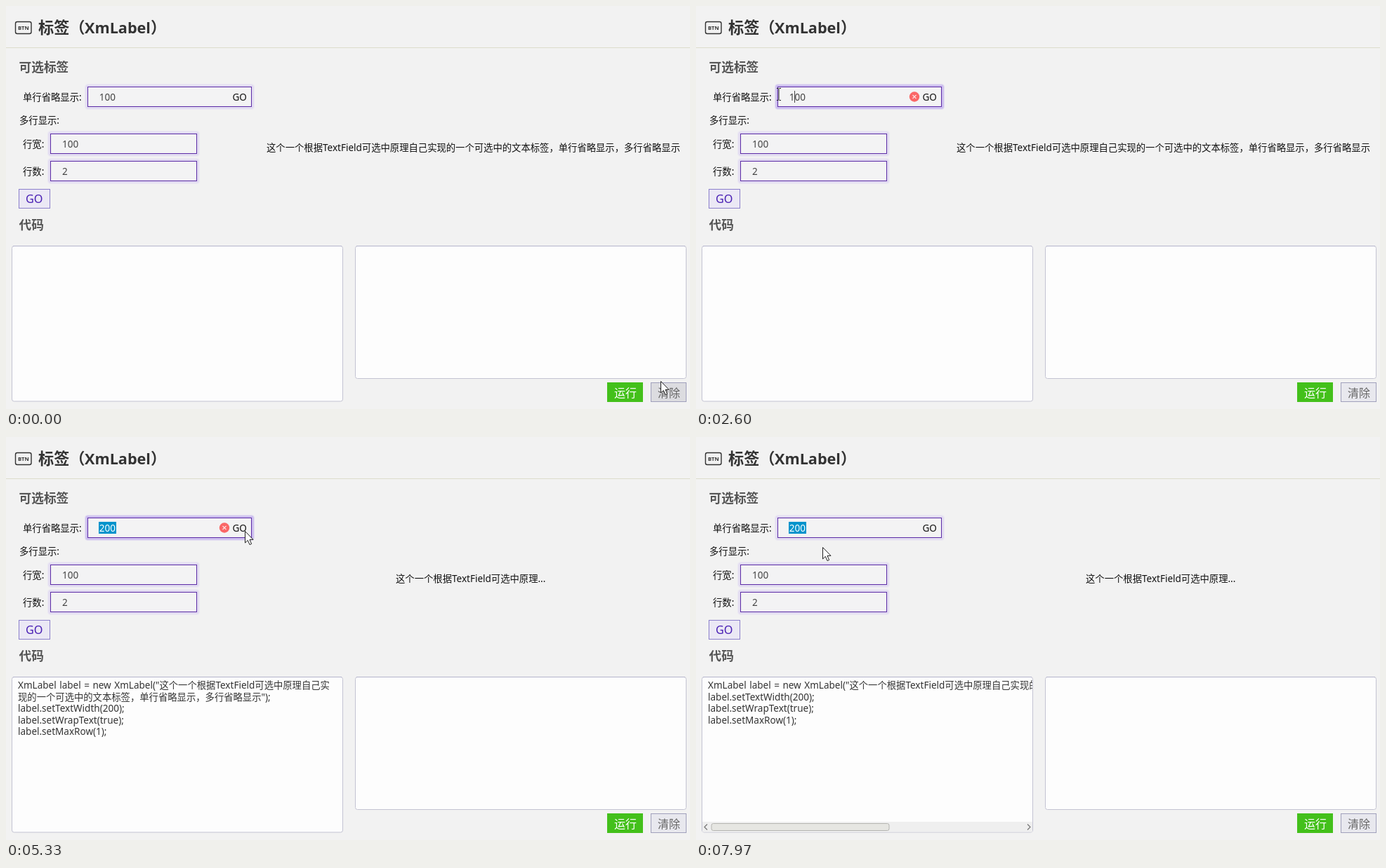
Write an HTML page that moves like this. It is 974 px wide and 575 px high and loops after 8 s.

```html
<!DOCTYPE html>
<html lang="zh-CN">
<head>
<meta charset="utf-8">
<style>
html, body { margin: 0; width: 100%; height: 100%; overflow: hidden; background: #f2f2f2; }
svg { display: block; }
text { font-family: "Noto Sans", "Noto Sans CJK SC", "Noto Sans CJK", sans-serif; white-space: pre; }
.code { word-spacing: 1px; }
</style>
</head>
<body>
<svg id="stage" width="974" height="575" viewBox="0 0 974 575"></svg>
<script>
const LOOP = 8000;
const INTRO = '这个一个根据TextField可选中原理';
const REST1 = '自己实', REST2 = '现的一个可选中的文本标签，单行省略显示，多行省略显示';
const FULL = INTRO + REST1 + REST2;

const esc = s => s.replace(/&/g, '&amp;').replace(/</g, '&lt;').replace(/>/g, '&gt;');
// Latin runs are set a touch larger than the Chinese ones
const runs = s => esc(s).replace(/[ -~]+/g, m => `<tspan font-size="1.015em">${m}</tspan>`);
const text = (x, y, s, fill = '#111', size = 13.33, extra = '') =>
  `<text x="${x}" y="${y}" fill="${fill}" font-size="${size}" ${extra}>${runs(s)}</text>`;
const box = (x, y, w, h, fill, stroke = 'none', extra = '') =>
  `<rect x="${x}" y="${y}" width="${w}" height="${h}" fill="${fill}" stroke="${stroke}" ${extra}/>`;
const group = (id, inner) => `<g id="${id}">${inner}</g>`;
const code = lines => lines.map((s, i) =>
  text(17, 359 + i * 16.6, s, '#333', 13.33, 'class="code"')).join('');

const fields = [
  { x: 116.5, y: 115.5, w: 233, icon: 311 },
  { x: 63.5, y: 182.5, w: 208, icon: 258 },
  { x: 63.5, y: 221.5, w: 208, icon: 258 }
];
const field = ({ x, y, w, icon }, i) => {
  const cy = y + 14;
  const ring = (width, opacity) => box(x, y, w, 28, 'none', '#8a62e6',
    `stroke-width="${width}" stroke-opacity="${opacity}" stroke-linejoin="round"`);
  return ring(9, .07) + ring(6, .1) + group('glow' + i, ring(8, .16) + ring(6, .1)) +
    box(x, y, w, 28, '#f3f3f4', '#5c2ca6') +
    group('icon' + i, `<circle cx="${icon}" cy="${cy}" r="7.2" fill="#fa6767"/>
      <path d="M${icon - 2.5} ${cy - 2.5}l5 5m0 -5l-5 5" stroke="#ffdede" stroke-width="1.2"/>`);
};

const stage = document.getElementById('stage');
stage.innerHTML =
  box(0, 0, 974, 575, '#f2f2f2') +
  box(13.5, 22.5, 22.5, 17, 'none', '#333', 'rx="2.5" stroke-width="1.4"') +
  text(24.8, 33.5, 'BTN', '#333', 7.5, 'text-anchor="middle" font-weight="600"') +
  text(46, 39, '标签（', '#333', 22.2, 'font-weight="700"') +
  text(112, 39, 'XmLabel', '#333', 21.3, 'font-weight="700"') +
  text(206, 39, '）', '#333', 22.2, 'font-weight="700"') +
  box(0, 59, 974, 1, '#dcdccb') +
  text(18.5, 93.5, '可选标签', '#555', 17.7, 'font-weight="700"') +
  text(18.5, 319, '代码', '#555', 17.7, 'font-weight="700"') +
  text(24, 134.5, '单行省略显示:') + text(19, 168, '多行显示:') +
  text(24, 202, '行宽:') + text(24, 241, '行数:') +
  fields.map(field).join('') +
  text(322.5, 134.5, 'GO') +
  box(132, 121, 25, 17, '#0093cc', 'none', 'id="pick"') +
  text(132.8, 134.5, '100', '#444', 13.33, 'id="value"') +
  box(140, 121, 1, 17, '#444', 'none', 'id="caret"') +
  text(80, 201.7, '100', '#444') + text(80, 240.7, '2', '#444') +
  box(18.5, 261.5, 44, 27, '#ebe8f5', '#8c80cc') + text(28, 281, 'GO', '#4a20b4', 16) +
  group('before', text(371, 207, FULL)) +
  group('after', text(555, 207, INTRO + '...')) +
  box(8.5, 342.5, 471, 221.5, '#fdfdfd', '#c3c3d2', 'rx="3"') +
  box(497.5, 342.5, 471, 189, '#fdfdfd', '#c3c3d2', 'rx="3"') +
  box(10, 342, 468, 1, '#b4b4cc') + box(499, 342, 468, 1, '#b4b4cc') +
  group('wrapped', code([`XmLabel label = new XmLabel("${INTRO}${REST1}`, `${REST2}");`,
    'label.setTextWidth(200);', 'label.setWrapText(true);', 'label.setMaxRow(1);'])) +
  group('unwrapped', `<svg width="479" height="575">` +
    code([`XmLabel label = new XmLabel("${FULL}");`,
      'label.setTextWidth(200);', 'label.setWrapText(true);', 'label.setMaxRow(1);']) + `</svg>` +
    box(9, 549, 470, 14.5, '#efefef') +
    box(22, 551.5, 253, 10, '#e6e6e2', '#b4b4b0', 'rx="2.5"') +
    `<path d="M16 552.5l-4 4 4 4M472 552.5l4 4-4 4" fill="none" stroke="#777" stroke-width="1.2"/>`) +
  box(856, 537, 51, 28, '#43c01b') + text(866, 558, '运行', '#fff', 16) +
  box(918.5, 537.5, 50, 27, '#e8e8ee', '#a0a0bc', 'id="clear"') + text(928, 558, '清除', '#666', 16) +
  group('arrow', `<path d="M.5 .5V17L4.3 13.4 7 19.6 9.6 18.5 7 12.4H12Z" fill="#fff"
    stroke="#222" stroke-linejoin="round"/>`) +
  group('beam', `<path d="M-3 -8.5H-.5M.5 -8.5H3M0 -8V8M-3 8.5H-.5M.5 8.5H3" stroke="#222"/>`);

const el = {};
stage.querySelectorAll('[id]').forEach(e => el[e.id] = e);
const show = (id, on) => el[id].setAttribute('visibility', on ? 'visible' : 'hidden');

// pointer path: time, x, y
const path = [
  [30, 932, 535], [670, 300, 557], [830, 300, 557], [1030, 250, 360], [1330, 185, 82],
  [1530, 167, 115], [1630, 163, 126], [2300, 163, 126], [2450, 141, 128], [2520, 141, 128],
  [2670, 99, 125], [4300, 99, 125], [5100, 340, 134], [5400, 340, 134], [5500, 340, 136],
  [6030, 340, 136], [6300, 240, 180], [6630, 140, 243], [6800, 135, 243], [7070, 145, 216],
  [7430, 165, 204], [7670, 165, 204], [7970, 180, 157]
];
function pointer(t) {
  const i = path.findIndex(p => p[0] > t);
  if (i < 1) return (i ? path[path.length - 1] : path[0]).slice(1);
  const [a, b] = [path[i - 1], path[i]];
  const k = (t - a[0]) / (b[0] - a[0]);
  return [1, 2].map(j => Math.round(a[j] + (b[j] - a[j]) * k));
}

function draw(t) {
  const [x, y] = pointer(t);
  const within = (t0, t1) => t >= t0 && t < t1;

  let beam = false;
  fields.forEach((f, i) => {
    const near = x > f.x - 6 && x < f.x + f.w + 5 && y > f.y - 6 && y < f.y + 32;
    const hover = near && !(i === 1 && y >= 215);
    const on = i ? hover : hover || within(1480, 6150);
    show('glow' + i, on);
    show('icon' + i, on);
    beam ||= x > f.x && x < f.icon - 8 && y > f.y && y < f.y + 28;
  });

  const picked = t >= 5230;
  show('pick', picked);
  el.value.setAttribute('fill', picked ? '#fff' : '#444');
  const value = t < 3570 ? '100' : t < 4000 ? '00' : '200';
  el.value.firstChild.textContent = value;
  const blink = within(1930, 2430) || within(2500, 3030) || within(3530, 4030) ||
    (within(4530, 5230) && t < 5030);
  show('caret', blink);
  el.caret.setAttribute('x', t < 2500 ? 156 : value === '00' ? 132 : 140);

  show('before', !picked);
  show('after', picked);
  show('wrapped', within(5260, 5430));
  show('unwrapped', t >= 5430);
  el.clear.setAttribute('fill', x >= 918 && y >= 537 - 3 ? '#dcdce0' : '#e8e8ee');

  show('arrow', !beam);
  show('beam', beam);
  el[beam ? 'beam' : 'arrow'].setAttribute('transform', `translate(${x} ${y})`);
}

const start = performance.now();
function tick() {
  draw((performance.now() - start) % LOOP);
  requestAnimationFrame(tick);
}
draw(0);
requestAnimationFrame(tick);
</script>
</body>
</html>
```
